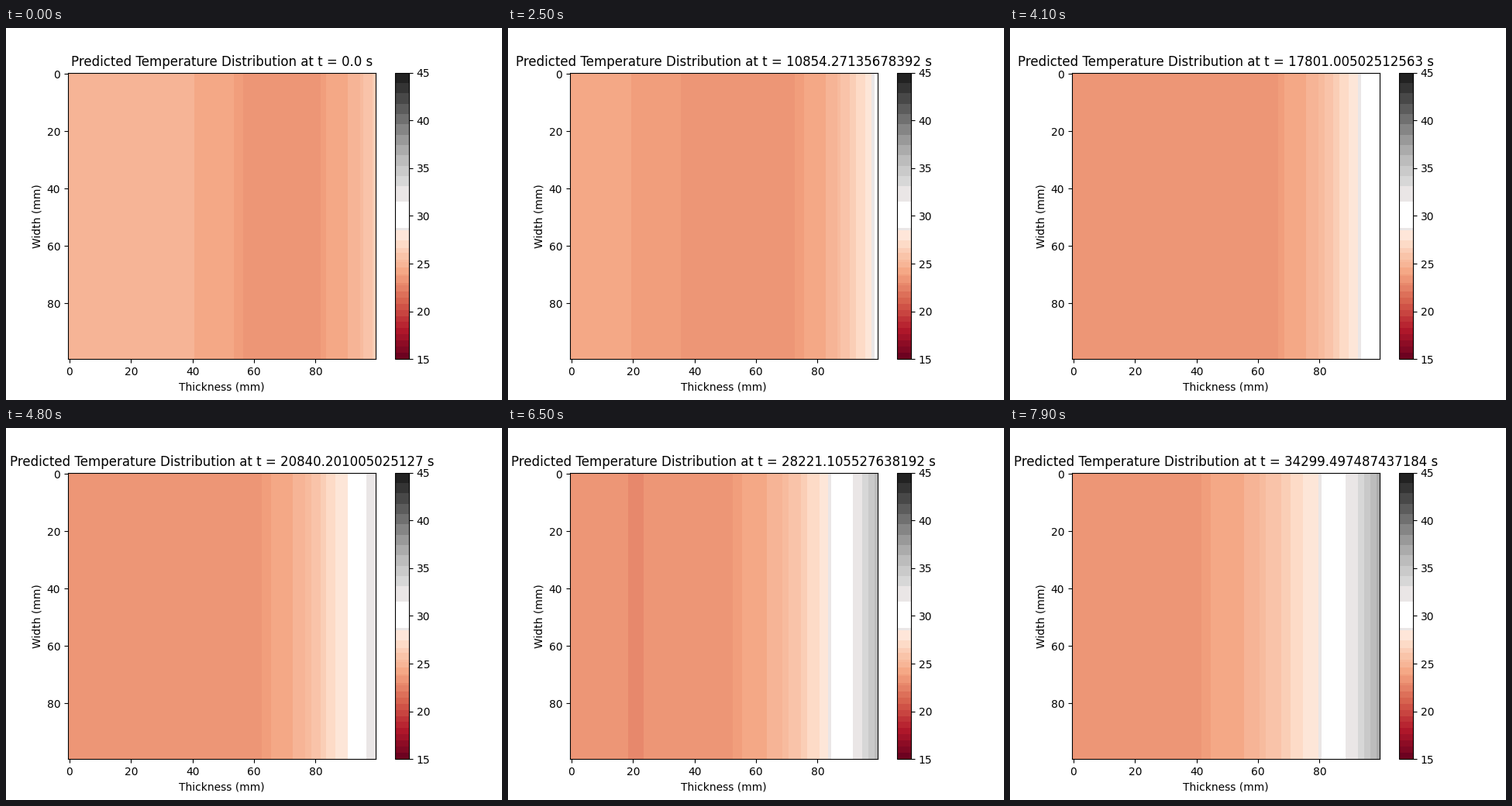
Recreate the animation shown at these times as a matplotlib script. Size 640 by 480 pixels, loop 8 s.

```python
import numpy as np
import matplotlib.pyplot as plt
from matplotlib.animation import FuncAnimation
from matplotlib.colors import ListedColormap

FRAMES = 80
LOW, HIGH = 15, 45
BASE = 22.5
times = np.linspace(0, 86400, 200)[:FRAMES]
columns = np.arange(100)


def banded_cmap():
    """RdGy in flat bands: even steps at both ends, uneven near the middle."""
    reds = np.linspace(LOW, 22.75, 13)
    middle = [22.95, 23.7, 23.85, 24.6, 25.2, 25.4, 26.1, 26.6, 27.4,
              28.45, 28.75, 31.5]
    greys = np.linspace(33.1, HIGH, 12)
    limits = np.concatenate([reds, middle, greys])
    mids = (limits[:-1] + limits[1:]) / 2
    shades = plt.get_cmap("RdGy")((mids - LOW) / (HIGH - LOW))

    white = np.searchsorted(limits, 30) - 1
    shades[[white - 1, white + 1], :3] = np.array([234, 230, 230]) / 255
    shades[white] = 1

    steps = LOW + (np.arange(600) + 0.5) * (HIGH - LOW) / 600
    return ListedColormap(shades[np.searchsorted(limits, steps) - 1])


def temperature(step):
    """Heat entering from the right over a warm left side that cools down."""
    s = step / (FRAMES - 1)

    front = 98.5 - 0.286 * step - 0.00134 * step ** 2
    steepness = 0.07 - 0.0263 * s ** 2
    heat = 3.6 * np.exp(steepness * (columns - front))

    shoulder = 53 - 40 * np.sin(np.pi * s / 2) ** 3
    width = 8.5 + 3 * s
    warmth = 2.5 * np.exp(-step / 42)
    rest = warmth / (1 + np.exp((columns - shoulder) / width))

    return np.tile(BASE + heat + rest, (100, 1))


fig, ax = plt.subplots(figsize=(6.4, 4.8), dpi=100)
image = ax.imshow(temperature(0), cmap=banded_cmap(), vmin=LOW, vmax=HIGH,
                  aspect="auto", interpolation="nearest")
fig.colorbar(image, ax=ax, ticks=range(LOW, HIGH + 1, 5))
ax.set_xlabel("Thickness (mm)")
ax.set_ylabel("Width (mm)")
title = ax.set_title("")


def update(step):
    image.set_data(temperature(step))
    title.set_text(f"Predicted Temperature Distribution at t = {times[step]} s")
    return image, title


anim = FuncAnimation(fig, update, frames=FRAMES, interval=100, repeat=True,
                     repeat_delay=0, blit=False)
plt.show()
```
